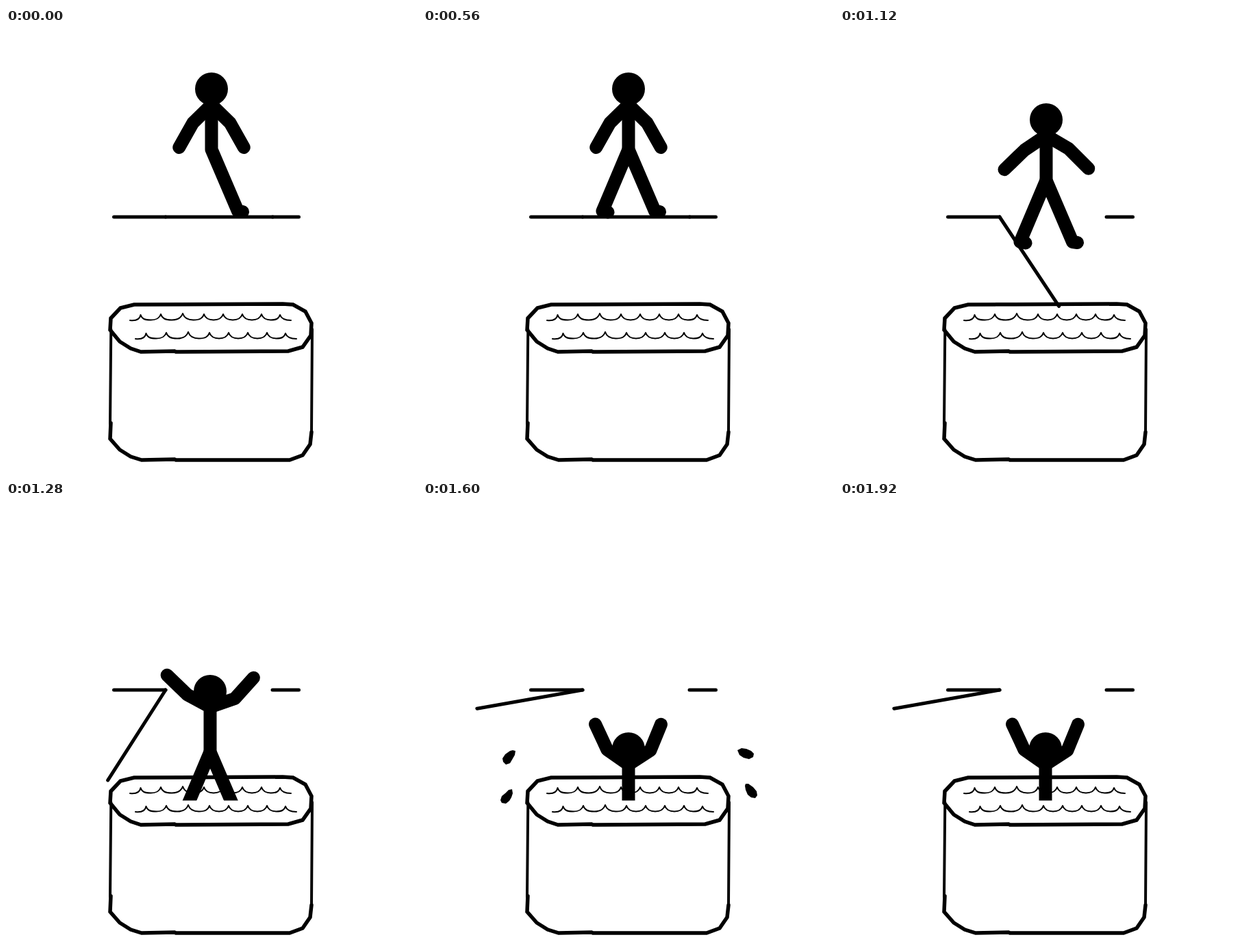
An HTML page that plays this animation: 600 by 650 pixels, repeating every 2.32 s.

```html
<!DOCTYPE html>
<html lang="en">
<head>
<meta charset="utf-8">
<title>Trapdoor</title>
<style>
  html, body { margin: 0; width: 100%; height: 100%; overflow: hidden; background: #fff; }
  svg { display: block; width: 100%; height: 100%; }
</style>
</head>
<body>
<svg viewBox="0 0 600 650" fill="none" stroke="#000" stroke-linecap="round" stroke-linejoin="round">
  <defs>
    <clipPath id="dry"><rect width="600" height="437.5"/></clipPath>
  </defs>

  <g id="pool">
    <g stroke-width="5.5" stroke-linejoin="miter">
      <path d="M153 424L167 409L187 404L404 403L419 404L437 414L446 431L445 449L433 466L412 472L248 473L246 472L197 473L182 468L166 458L152 441Z"/>
      <path d="M153 577L152 600L166 616L182 626L198 631L246 630L248 631L414 631L433 624L444 608L446 590"/>
    </g>
    <path d="M153.3 440L152 578M447 440L446 590" stroke-width="4"/>
    <path id="wave" stroke-width="2"/>
    <use href="#wave" x="8" y="27"/>
  </g>

  <g stroke-width="5">
    <path d="M157.500 276H233M389 276H427.500"/>
    <path id="door" d="M233 276h156.500"/>
  </g>

  <g clip-path="url(#dry)">
    <g id="man" stroke-width="19">
      <path id="backLeg" d="M0 88.500L-38 178.500L-30 180"/>
      <path d="M0 23V88.500L38.500 178.500L45.500 179.500"/>
      <path id="arms"/>
      <circle r="24" fill="#000" stroke="none"/>
    </g>
  </g>

  <g id="drops" fill="#000" stroke="none">
    <path d="M135 365L134 371L130 378L127 383L121 385L117 381L116 376L120 370L127 365L131 364Z"/>
    <path d="M130 421L131 427L129 433L126 438L121 442L115 441L113 437L115 431L120 427L125 422Z"/>
    <path d="M459 364L465 361L472 362L479 365L483 369L482 374L476 377L468 375L462 371Z"/>
    <path d="M471 413L475 413L482 418L487 424L488 430L485 434L479 433L474 429L471 422L470 416Z"/>
  </g>
</svg>
<script>
  const LOOP = 2320, STEP = 80;
  const $ = id => document.getElementById(id);
  const rad = deg => deg * Math.PI / 180;

  // head x, head y, left arm angles, right arm angles, door angle
  const stand = [300, 89, 44.5, 60.6, 44.5, 60.6, 0];
  const fall = [
    [300, 88, 44.5, 60.6, 44.5, 60.6, 0],
    [301, 134, 34, 44, 30.5, 45, 56.4],
    [298, 278, -28.6, -44, -19, -48, 122.6],
    [300, 362, -35, -65, -33, -67.7, 170]
  ];

  function spline(keys, u) {
    const last = keys.length - 1;
    const i = Math.min(Math.floor(u), last - 1), f = u - i;
    const at = n => keys[Math.max(0, Math.min(last, n))];
    const [a, b, c, d] = [at(i - 1), at(i), at(i + 1), at(i + 2)];
    return b.map((p, k) => p + 0.5 * f * (c[k] - a[k]
      + f * (2 * a[k] - 5 * p + 4 * c[k] - d[k]
      + f * (3 * (p - c[k]) + d[k] - a[k]))));
  }

  function arm(side, upper, lower) {
    const ex = side * 38 * Math.cos(rad(upper)), ey = 23 + 38 * Math.sin(rad(upper));
    const hx = ex + side * 41 * Math.cos(rad(lower)), hy = ey + 41 * Math.sin(rad(lower));
    return `M0 23L${ex} ${ey}L${hx} ${hy}`;
  }

  function wavePath() {
    const crests = [[196.5, 419], [226, 418], [258, 417], [289, 418], [317, 418], [345, 418], [373, 418], [400, 419]];
    const base = 426.5;
    let d = "M181 427C190 428 195.500 425 196.500 419";
    crests.slice(1).forEach(([x, y], i) => {
      const [px, py] = crests[i];
      d += `C${px + 2} ${py + 6} ${px + 6} ${base} ${(px + x) / 2} ${base}`
        + `C${x - 6} ${base} ${x - 2} ${y + 6} ${x} ${y}`;
    });
    return d + "C402 425 407 427 416 427";
  }

  function draw(time) {
    const t = Math.floor((time % LOOP) / STEP) * STEP;

    const fade = Math.max(0, Math.min(6, (t - 80) / STEP));
    $("backLeg").setAttribute("opacity", fade === 6 ? 1 : fade * 0.155);

    const pose = t < 960 ? stand : spline(fall, Math.min(3, (t - 960) / (2 * STEP)));
    const [x, y, lu, ll, ru, rl, door] = pose;
    $("man").setAttribute("transform", `translate(${x} ${y})`);
    $("arms").setAttribute("d", arm(-1, lu, ll) + arm(1, ru, rl));
    $("door").setAttribute("transform", `rotate(${door} 233 276)`);

    const k = (t - 1600) / STEP;
    $("drops").setAttribute("visibility", t >= 1520 && t < 1920 ? "visible" : "hidden");
    [...$("drops").children].forEach((drop, i) => {
      const dx = (i < 2 ? -27 : 26) * k, dy = 9 * k + 10 * k * k;
      drop.setAttribute("transform", `translate(${dx} ${dy})`);
    });
  }

  $("wave").setAttribute("d", wavePath());
  const start = performance.now();
  function tick() {
    draw(performance.now() - start);
    requestAnimationFrame(tick);
  }
  tick();
</script>
</body>
</html>
```
